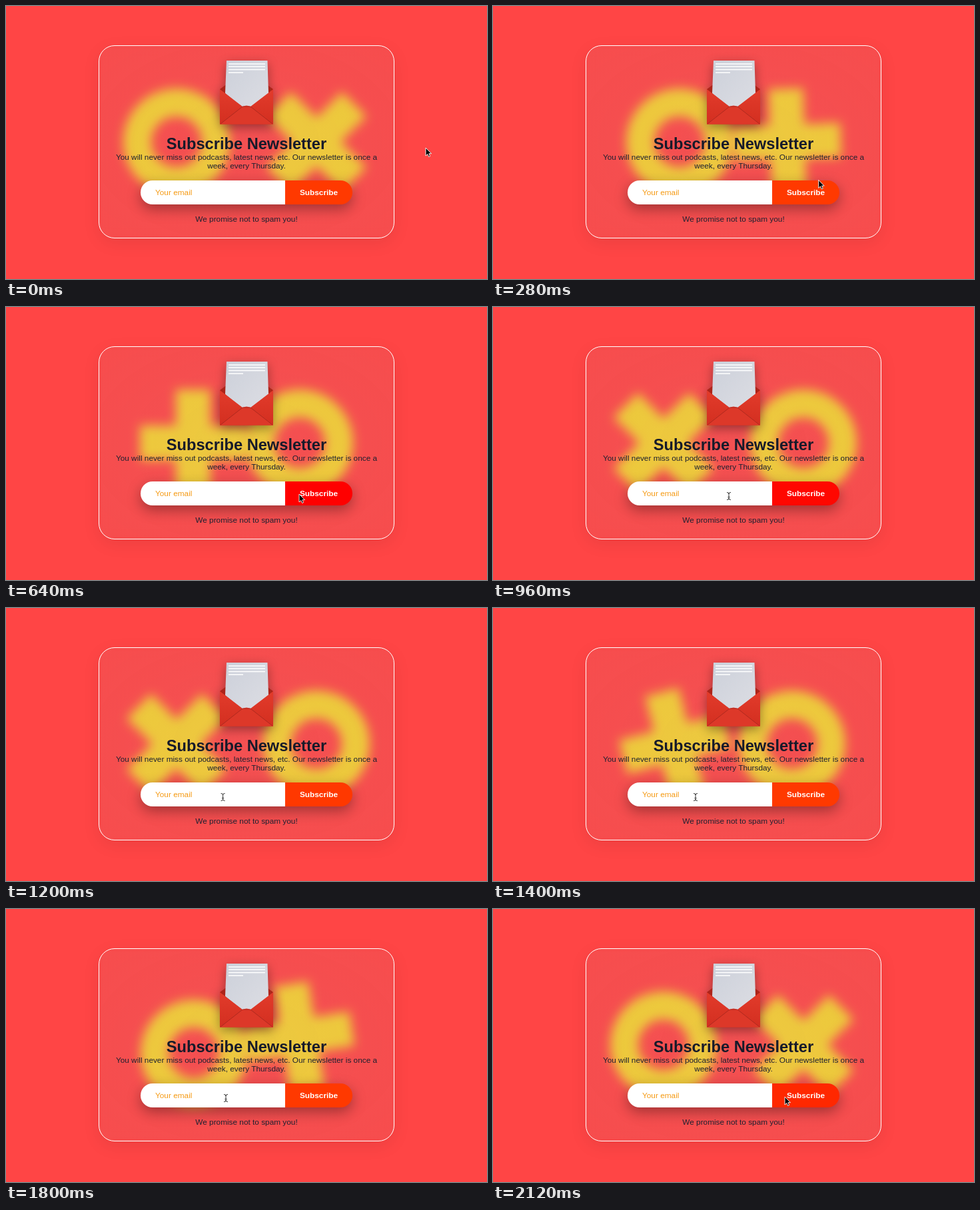
These frames come from a looping animation (722 by 410 pixels, 2.16 s). An HTML page:

```html
<!DOCTYPE html>
<html lang="en">
<head>
<meta charset="utf-8">
<title>Subscribe Newsletter</title>
<style>
  html, body { margin: 0; width: 100%; height: 100%; overflow: hidden; background: #ff4545; }
  svg { position: absolute; left: 0; top: 0; }
  #panel {
    position: absolute; left: 139px; top: 59px; width: 444px; height: 290px;
    box-sizing: border-box; border: 1px solid #fff; border-radius: 24px;
    background: radial-gradient(rgba(160, 160, 172, .13), rgba(165, 160, 165, .09));
    backdrop-filter: blur(8px);
    box-shadow: 0 7px 26px rgba(0, 0, 0, .08);
  }
  text { font: 11.82px "Liberation Sans", Arial, sans-serif; fill: #1d2030; }
  .mid { text-anchor: middle; }
  .bold { font-weight: bold; }
  #title { font-size: 23.65px; fill: #161a2a; }
  #form { filter: drop-shadow(0 7px 10px rgba(0, 0, 0, .34)); }
  #letter { filter: drop-shadow(0 5px 8px rgba(0, 0, 0, .36)); }
</style>
</head>
<body>
<svg width="722" height="410">
  <g id="pair" fill="#f7ce30">
    <circle id="ring" r="59" fill="none" stroke="#f7ce30" stroke-width="42"/>
    <path id="cross" d="M-26-80h52v54h54v52h-54v54h-52v-54h-54v-52h54z"/>
  </g>
</svg>
<div id="panel"></div>
<svg width="722" height="410">
  <defs>
    <linearGradient id="paper" x2="1" y2="1">
      <stop stop-color="#ccd0da"/><stop offset="1" stop-color="#dcdde3"/>
    </linearGradient>
    <linearGradient id="front" x2="0" y2="1">
      <stop stop-color="#e23b2b"/><stop offset="1" stop-color="#d32f20"/>
    </linearGradient>
  </defs>
  <g id="letter">
    <path d="M321 125L333 116H389L401 125V150H321z" fill="#ad2419"/>
    <path d="M331 82H392.500L394 131L367 152H355L329 131z" fill="url(#paper)"/>
    <path d="M334 87H389M334 91H389M334 95.500H389M334 100H356" stroke="#fff" stroke-width="1.600"/>
    <path d="M321 125L355 151H367L401 125V177.500H321z" fill="url(#front)"/>
    <path d="M321 177.500L353 152Q361 147 369 152L401 177.500z" fill="#dd3829"/>
    <path d="M322 177L355 151H367L400 177" fill="none" stroke="#a9281d" stroke-width=".9"/>
  </g>
  <text id="title" class="mid bold" x="361" y="214.500">Subscribe Newsletter</text>
  <text class="mid" x="361" y="230.500">You will never miss out podcasts, latest news, etc. Our newsletter is once a</text>
  <text class="mid" x="361" y="244">week, every Thursday.</text>
  <g id="form">
    <path d="M419 262H220a18 18 0 0 0 0 36H419z" fill="#fff"/>
    <path id="button" d="M419 262H502a18 18 0 0 1 0 36H419z"/>
  </g>
  <text x="224" y="284" style="fill:#f59a14">Your email</text>
  <text class="mid bold" x="469.500" y="284" style="fill:#fff">Subscribe</text>
  <text class="mid" x="361" y="323.500">We promise not to spam you!</text>
  <path id="arrow" d="M0 0V12L2.800 9.500L4.600 13.500L6.600 12.600L4.900 8.700H8.500z" fill="#000" stroke="#fff" stroke-width=".9"/>
  <path id="beam" d="M-3-5.500Q0-5.500 0-3.500Q0-5.500 3-5.500M0-4V4M-3 5.500Q0 5.500 0 3.500Q0 5.500 3 5.500M-1.500 1.500H1.500" fill="none" stroke="#333" stroke-width="1"/>
</svg>
<script>
const LOOP = 2160, STEP = 40, TURN = 1200;
const el = id => document.getElementById(id);
const part = (t, a, b) => Math.min(1, Math.max(0, (t - a) / (b - a)));
const smooth = (t, a, b) => { const x = part(t, a, b); return x * x * (3 - 2 * x); };
const easeOut = (t, a, b) => 1 - (1 - part(t, a, b)) ** 2;
const place = (id, ...ops) => el(id).setAttribute('transform', ops.join(' '));

// time, x, y
const route = [
  [0, 630, 213], [60, 630, 213], [380, 446, 276], [480, 439, 278], [640, 440, 281],
  [820, 440, 282], [960, 354, 284], [1400, 304, 284], [1800, 330, 284], [2120, 438, 282]
];

function pointer(t) {
  let i = 1;
  while (i < route.length - 1 && t > route[i][0]) i++;
  const [a, x, y] = route[i - 1], [b, u, v] = route[i], k = smooth(t, a, b);
  return [x + (u - x) * k, y + (v - y) * k];
}

function draw(t) {
  // Join the shapes, swing half a turn, then part again.
  const p = t % TURN;
  const join = smooth(p, 0, 320), split = smooth(p, 640, 920);
  const gap = 80 + 25 * (1 - join + split);
  const angle = 180 * (Math.floor(t / TURN) + smooth(p, 340, 640));
  place('pair', 'translate(361 204)', `rotate(${angle})`);
  place('ring', `translate(${-gap} 0)`);
  place('cross', `translate(${gap} 0)`, `rotate(${45 * (join - 1 + split)})`);

  const hover = easeOut(t, 340, 640) - easeOut(t, 940, 1240) + easeOut(t, 2070, 2370);
  el('button').setAttribute('fill', `rgb(255,${Math.round(57 * (1 - hover))},0)`);

  const [x, y] = pointer(t);
  const overInput = x < 419;
  place('arrow', `translate(${x} ${y})`);
  place('beam', `translate(${x} ${y})`);
  el('arrow').style.display = overInput ? 'none' : '';
  el('beam').style.display = overInput ? '' : 'none';
}

const start = performance.now();
function tick() {
  const t = (performance.now() - start) % LOOP;
  draw(Math.floor(t / STEP) * STEP);
  requestAnimationFrame(tick);
}
tick();
</script>
</body>
</html>
```
